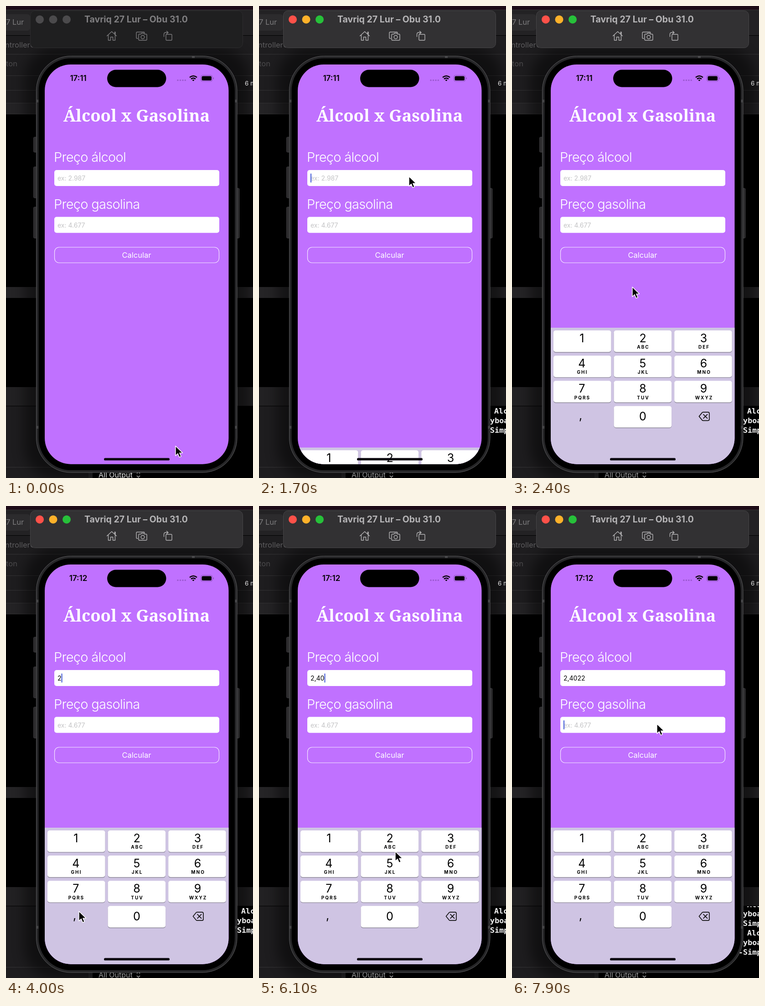
An HTML page for the animation above (8 s loop, 542x1033 px).

```html
<!DOCTYPE html>
<html lang="pt">
<head>
<meta charset="utf-8">
<title>Álcool x Gasolina</title>
<style>
html, body { margin: 0; width: 100%; height: 100%; overflow: hidden; background: #000; }
svg { display: block; width: 542px; height: 1033px; font-family: Inter, Roboto, sans-serif; }
text { white-space: pre; }
.line { stroke: #343335; stroke-width: 1; }
.mid { text-anchor: middle; }
.serif { font: 700 36.5px "Noto Serif", "Liberation Serif", serif; fill: #fff; }
.label { font-weight: 300; font-size: 29px; letter-spacing: -.72px; fill: #fff; }
.hint { font-size: 14px; fill: #c3c3c5; }
.typed { font-size: 14px; fill: #000; }
.digit { font-size: 25px; }
.letters { font-size: 10px; font-weight: 700; letter-spacing: 2px; }
.log { font: 700 16.7px "DejaVu Sans Mono", "Liberation Mono", monospace; fill: #f2f2f2; }
.icon { fill: none; stroke: #7c7b7d; stroke-width: 1.4; stroke-linejoin: round; stroke-linecap: round; }
#title { fill: #7f7e80; }
.light { fill: #4b4a4c; }
#panel { fill: #1f1f20; stroke: #2d2c2e; }
#output { fill: #e6e6e6; font-size: 16px; }
.active #panel { fill: #323133; stroke: #464547; }
.active #title { fill: #b5b4b6; }
.active .icon { stroke: #b5b4b6; }
.active .red { fill: #fe5149; }
.active .yellow { fill: #fdb12a; }
.active .green { fill: #27c13a; }
.active #output { fill: #9b9b9c; }
</style>
</head>
<body>
<svg id="stage" viewBox="0 0 542 1033">
  <defs>
    <clipPath id="screen"><rect x="85" y="128" width="403.5" height="874.7" rx="57"/></clipPath>
    <clipPath id="console"><rect x="190" y="876" width="352" height="134"/></clipPath>
    <filter id="soft" x="-20%" y="-20%" width="140%" height="140%"><feGaussianBlur stdDeviation="14"/></filter>
  </defs>

  <!-- editor behind -->
  <rect width="542" height="1033"/>
  <rect width="542" height="8" fill="#1d0b17"/>
  <rect y="8" width="542" height="229" fill="#1e1d1f"/>
  <rect y="9" width="542" height="55" fill="#232224"/>
  <rect x="-10" y="18" width="63" height="36" rx="6" fill="#2c2b2d"/>
  <rect y="212" width="542" height="25" fill="#242325"/>
  <path class="line" d="M0 8.5H542M0 105.5H542M0 152.5H542M0 184.5H542M0 212.5H542M0 236.5H542"/>
  <path d="M0 64.5H542" stroke="#000"/>
  <rect y="615" width="542" height="24" fill="#252426"/>
  <rect y="834" width="542" height="41" fill="#222123"/>
  <rect y="876" width="181" height="157" fill="#1e1d1f"/>
  <rect x="181" y="1009" width="9" height="24" fill="#29282a"/>
  <path class="line" d="M0 1009.5H181"/>
  <rect x="40" y="90" width="495" height="945" rx="70" opacity=".45" filter="url(#soft)"/>
  <text x="0" y="41" font-size="16.5" fill="#7d7c7e">7 Lur</text>
  <text x="-2" y="91" font-size="16.5" fill="#5d5c5e">ntrollerC</text>
  <text x="0" y="132" font-size="16.5" fill="#4b4a4c">ton</text>
  <text x="524" y="174" font-size="13.5" fill="#e4e4e4">6 min</text>
  <text id="output" x="203" y="1032">All Output</text>
  <path d="M287 1023l3.5-3.5 3.5 3.5M287 1028l3.5 3.5 3.5-3.5" fill="none" stroke="#aaa" stroke-width="1.5"/>
  <g clip-path="url(#console)"><g id="logs"></g></g>

  <!-- window bar -->
  <rect id="panel" x="53.5" y="10.5" width="466" height="81" rx="10"/>
  <circle class="light red" cx="74" cy="29.5" r="9"/>
  <circle class="light yellow" cx="103.5" cy="29.5" r="9"/>
  <circle class="light green" cx="133" cy="29.5" r="9"/>
  <text id="title" class="mid" x="285.5" y="36" font-size="19.5" font-weight="700">Tavriq 27 Lur – Obu 31.0</text>
  <g class="icon">
    <path d="M221.5 65.5L232 56l10.5 9.5M224.5 63.5V75h5v-7h5v7h5V63.5M238.5 61V57h1.5v5"/>
    <path d="M289 71h-1.500q-1.500 0-1.500-1.500V59q0-2 2-2h14q2 0 2 2"/>
    <path d="M292 61.500h4l1.500-2h5l1.500 2h3q2 0 2 2V73q0 2-2 2h-14q-2 0-2-2v-9.500q0-2 1-2z"/>
    <circle cx="300" cy="68" r="3.8"/>
    <rect x="351" y="62" width="13" height="13" rx="1.5"/>
    <path d="M346.500 67V62q0-4 4-4h5M352.500 55l3.500 3-3.500 3"/>
  </g>

  <!-- phone body -->
  <g fill="#2b2a2c" stroke="#3b3a3d">
    <rect x="60.5" y="287" width="8" height="33" rx="2"/>
    <rect x="60.5" y="352" width="8" height="68" rx="2"/>
    <rect x="60.5" y="440" width="8" height="68" rx="2"/>
    <rect x="504" y="399" width="8" height="109" rx="2"/>
  </g>
  <rect x="66.500" y="109.500" width="440.5" height="911.500" rx="76" fill="#262628" stroke="#5c5c5e"/>
  <path d="M408 112h6M69.500 205v6M504.500 205v6M69.500 919v6M504.500 919v6" stroke="#454547" stroke-width="4"/>
  <rect x="71.500" y="114.500" width="430.5" height="901.500" rx="71"/>

  <!-- app -->
  <g clip-path="url(#screen)">
    <rect x="85" y="128" width="404" height="875" fill="#c071ff"/>
    <text id="clock" class="mid" x="158.5" y="164" font-size="17" font-weight="600"></text>
    <rect x="222" y="139.5" width="129.5" height="38" rx="19"/>
    <g fill="#9c59d2">
      <circle cx="377" cy="162.5" r="1.8"/><circle cx="382.5" cy="162.5" r="1.8"/>
      <circle cx="388" cy="162.5" r="1.8"/><circle cx="393.3" cy="162.5" r="1.8"/>
    </g>
    <g fill="none" stroke="#000" stroke-width="2.5">
      <path d="M403 156.300q8-6.600 16 0M406 159.800q5-4 10 0"/>
      <path d="M411 164.500l-2.500-2.600q2.500-2 5 0z" fill="#000" stroke="none"/>
    </g>
    <rect x="427.5" y="151.5" width="25.5" height="13.5" rx="4" fill="none" stroke="#8b51b9"/>
    <rect x="429.5" y="153.5" width="21.5" height="9.5" rx="2.5"/>
    <path d="M454.500 156v4.500q1.500-.5 1.500-2.200t-1.500-2.300z" fill="#8b51b9"/>
    <text class="serif mid" x="286.5" y="253">Álcool x Gasolina</text>
    <text class="label" x="105" y="341">Preço álcool</text>
    <text class="label" x="105" y="444">Preço gasolina</text>
    <rect x="106" y="359" width="362" height="35" rx="5" fill="#fff"/>
    <rect x="106" y="461.5" width="362" height="35" rx="5" fill="#fff"/>
    <text id="hint" class="hint" x="113" y="382">ex: 2.987</text>
    <text id="typed" class="typed" x="113" y="382"></text>
    <text class="hint" x="113" y="484.5">ex: 4.677</text>
    <rect id="caret" width="2" height="20" rx="1" fill="#4259d8"/>
    <rect x="106.5" y="528" width="361" height="34" rx="10" fill="none" stroke="#f6eaff" stroke-width="1.2"/>
    <text class="mid" x="286.5" y="551" font-size="16.5" fill="#fff">Calcular</text>

    <g id="keyboard">
      <rect x="85" y="704" width="404" height="300" fill="#cfc4e3"/>
      <g id="keys"></g>
      <text class="digit mid" x="150.5" y="905">,</text>
      <path d="M410.500 898l6.500-8q1-1.200 2.500-1.200h10.500q3 0 3 3v12.400q0 3-3 3H419.500q-1.500 0-2.500-1.200zM420 893.700l8.600 8.600M428.600 893.700l-8.600 8.600" fill="none" stroke="#111" stroke-width="1.700" stroke-linejoin="round" stroke-linecap="round"/>
    </g>
    <rect x="215" y="989.3" width="144" height="5.2" rx="2.6" fill="#0b0710"/>
  </g>

  <path id="pointer" d="M1 2V23.200l5-4.700 3.300 7.900 3.900-1.600-3.400-7.700h6.700z" stroke="#fff" stroke-width="1.400" stroke-linejoin="round"/>
</svg>

<script>
const LOOP = 8000, STEP = 100;
const ACTIVATE = 1400, FOCUS = 1600, SLIDE = 1657, MINUTE = 3200, NEXT_FIELD = 7600, SCROLL = 7800;
const $ = id => document.getElementById(id);

function add(parent, tag, attrs, text = "") {
  const el = document.createElementNS("http://www.w3.org/2000/svg", tag);
  for (const k in attrs) el.setAttribute(k, attrs[k]);
  el.textContent = text;
  return parent.appendChild(el);
}

const letters = ["", "ABC", "DEF", "GHI", "JKL", "MNO", "PQRS", "TUV", "WXYZ"];
function addKey(col, row, digit, sub) {
  const x = 91 + col * 132.6, y = 710 + row * 55.1, mid = 153.4 + col * 133.6;
  const box = { x, width: 126.5, height: 47.2, rx: 5 };
  add($("keys"), "rect", { ...box, y: y + 1.4, fill: "#8e899b" });
  add($("keys"), "rect", { ...box, y, fill: "#fff" });
  add($("keys"), "text", { class: "digit mid", x: mid, y: y + (row < 3 ? 26 : 32) }, digit);
  if (sub) add($("keys"), "text", { class: "letters mid", x: mid + 1, y: y + 40.3 }, sub);
}
letters.forEach((sub, i) => addKey(i % 3, Math.floor(i / 3), i + 1, sub));
addKey(1, 3, 0, "");

const logLines = ["Alcool", "keyboard", "-Simple"], logX = [516, 487, 497];
const logs = [0, 1, 2, 3, 4, 5].map(i =>
  add($("logs"), "text", { class: "log", x: logX[i % 3], y: 892 + i * 20.8 }, logLines[i % 3]));

// time, x, y of the pointer tip
const path = [
  [300, 371, 961], [1200, 328, 371], [1800, 328, 371], [2400, 263, 613],
  [3000, 284, 733], [3600, 284, 733], [4000, 159, 885], [4300, 159, 885],
  [4600, 160, 788], [4800, 160, 788], [5300, 255, 877], [5500, 272, 892],
  [5700, 272, 892], [6100, 298, 754], [6300, 292, 735], [6900, 292, 735],
  [7500, 317, 475], [8000, 317, 475]
];
const typing = [[3600, "2"], [4300, "2,"], [4700, "2,4"], [5700, "2,40"], [6500, "2,402"], [6900, "2,4022"]];

function pointerAt(t) {
  if (t <= path[0][0]) return path[0].slice(1);
  const i = path.findIndex(p => p[0] >= t);
  const [t0, x0, y0] = path[i - 1], [t1, x1, y1] = path[i];
  const u = (t - t0) / (t1 - t0), e = u * u * (3 - 2 * u);
  return [x0 + (x1 - x0) * e, y0 + (y1 - y0) * e];
}

// solid, then a quick fade out and back in each second
function blink(ms) {
  const u = ms % 1000 / 1000;
  if (u < .55) return 1;
  return Math.max(0, 1 - (u - .55) / .15, (u - .9) / .1);
}

function slideOffset(t) {
  const w = Math.max(0, t - SLIDE) * .014;
  return 299 * Math.exp(-w) * (1 + w);
}

function draw(t) {
  $("stage").setAttribute("class", t >= ACTIVATE ? "active" : "");
  $("clock").textContent = t < MINUTE ? "17:11" : "17:12";

  const last = typing.filter(k => k[0] <= t).pop() || [FOCUS, ""];
  $("typed").textContent = last[1];
  $("hint").style.display = last[1] ? "none" : "";

  const second = t >= NEXT_FIELD;
  const width = last[1] && !second ? $("typed").getComputedTextLength() : 0;
  $("caret").setAttribute("x", 113 + width);
  $("caret").setAttribute("y", second ? 469 : 366.5);
  $("caret").style.opacity = t < FOCUS ? 0 : blink(t - (second ? NEXT_FIELD : last[0]));

  $("keyboard").setAttribute("transform", `translate(0 ${slideOffset(t).toFixed(2)})`);
  logs.forEach((el, i) => el.style.display = t >= (i < 3 ? FOCUS : SCROLL) ? "" : "none");
  $("logs").setAttribute("transform", `translate(0 ${t >= SCROLL ? -14.5 : 0})`);
  $("pointer").setAttribute("transform", `translate(${pointerAt(t)})`);
}

const start = performance.now();
function tick() {
  const t = (performance.now() - start) % LOOP;
  draw(Math.floor(t / STEP) * STEP);
  requestAnimationFrame(tick);
}
tick();
</script>
</body>
</html>
```
